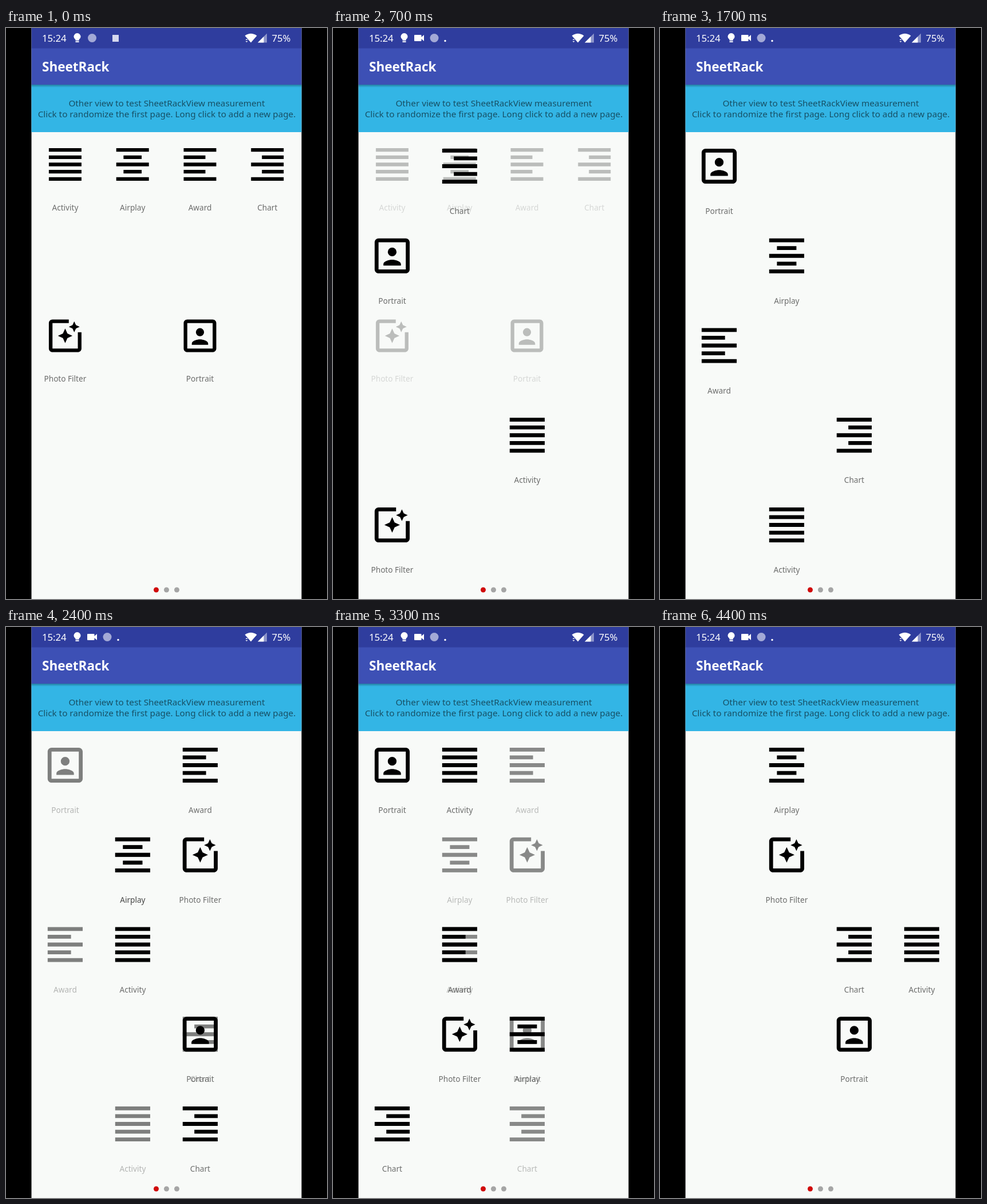
Animation, 561 px wide and 998 px high, one loop 4900 ms. Source, as an HTML page:

```html
<!DOCTYPE html>
<html lang="en">
<head>
<meta charset="utf-8">
<title>Shuffled grid</title>
<style>
  html, body { margin: 0; width: 100%; height: 100%; overflow: hidden; background: #000; }
  svg { display: block; font-family: "Noto Sans", sans-serif; }
  .status { font-size: 16.7px; fill: #fff; }
  .title { font-size: 22.5px; font-weight: 700; fill: #fff; }
  .banner { font-size: 15.25px; fill: #000; fill-opacity: .56; text-anchor: middle; }
  .label { font-size: 13.6px; fill: #000; fill-opacity: .57; text-anchor: middle; }
</style>
</head>
<body>
<svg width="561" height="998" viewBox="0 0 561 998">
  <defs>
    <linearGradient id="shade" x2="0" y2="1">
      <stop stop-opacity=".3"/>
      <stop offset="1" stop-opacity="0"/>
    </linearGradient>
  </defs>
  <rect width="561" height="998"/>
  <rect x="44.5" width="472" height="998" fill="#f8faf8"/>
  <rect x="44.5" y="99" width="472" height="83" fill="#33b5e5"/>
  <rect x="44.5" y="99" width="472" height="5" fill="url(#shade)"/>
  <rect x="44.5" y="35" width="472" height="64" fill="#3d50b5"/>
  <rect x="44.5" width="472" height="35.5" fill="#2f3d9e"/>

  <g class="status">
    <text x="63" y="24">15:24</text>
    <text x="464.5" y="24">75%</text>
    <path d="M121.500 22v-1.800a6 6 0 1 1 6 0v1.800zM121.500 23h6v2h-6z"/>
    <circle id="bubble" cy="17.500" r="7.500" fill="#a3a9d6"/>
    <rect id="badge" x="186" y="12" width="11" height="12" fill="#d5d8ee"/>
    <g id="recording">
      <path d="M143 12h10.500q1 0 1 1v3l4.500-4v11l-4.500-4v3q0 1-1 1h-10.500q-1 0-1-1v-9q0-1 1-1z"/>
      <circle cx="196" cy="22.500" r="1.700"/>
    </g>
    <path d="M417.500 13.500q10.500-7.500 21 0l-10.500 12z"/>
    <path d="M418.500 21l2-2 2 2zM418.500 23l2 2 2-2z"/>
    <path d="M440 25.500l16-16v16z" fill-opacity=".45"/>
    <path d="M440 25.500l10.500-10.500v10.500z"/>
  </g>

  <text class="title" x="63" y="76">SheetRack</text>
  <g class="banner">
    <text x="281" y="137">Other view to test SheetRackView measurement</text>
    <text x="281" y="156">Click to randomize the first page. Long click to add a new page.</text>
  </g>

  <g id="pages"></g>

  <g fill="#a5a5a5">
    <circle cx="262.500" cy="982" r="4.500" fill="#d00a0a"/>
    <circle cx="280.500" cy="982" r="4.500"/>
    <circle cx="298.500" cy="982" r="4.500"/>
  </g>
</svg>
<script>
const LOOP = 4900, STEP = 100, FADE = 250;
const $ = id => document.getElementById(id);
const clamp = v => Math.max(0, Math.min(1, v));

// Five text lines; the second and fourth are the short ones.
const lines = (x, w) => [3, 7, 11, 15, 19]
  .map((y, i) => i % 2 ? `M${x} ${y}h${w}v2h${-w}z` : `M3 ${y}h18v2H3z`).join("");

const items = {
  J: ["Activity", lines(3, 18)],
  C: ["Airplay", lines(7, 10)],
  L: ["Award", lines(3, 12)],
  R: ["Chart", lines(9, 12)],
  F: ["Photo Filter", "M19 10v9H5V5h9V3H5c-1.1 0-2 .9-2 2v14c0 1.100.9 2 2 2h14c1.100 0 2-.9 2-2v-9z" +
    "M17 10l.94-2.060L20 7l-2.060-.94L17 4l-.94 2.060L14 7l2.060.94z" +
    "M13.250 10.750L12 8l-1.250 2.750L8 12l2.750 1.250L12 16l1.250-2.750L16 12z"],
  P: ["Portrait", "M9.750 10a2.250 2.250 0 1 1 4.500 0a2.250 2.250 0 1 1-4.500 0z" +
    "M16.500 16.250c0-1.500-3-2.250-4.500-2.250s-4.500.75-4.500 2.250V17h9z" +
    "M19 3H5c-1.100 0-2 .9-2 2v14c0 1.100.9 2 2 2h14c1.100 0 2-.9 2-2V5c0-1.100-.9-2-2-2zM19 19H5V5h14z"]
};

const wide = { top: 238.5, rowGap: 299.5, colGap: 117.8, scale: 3.167, labelY: 80 };
const tight = { top: 241.5, rowGap: 156.75, colGap: 118, scale: 3.4, labelY: 83.5 };

// start: when the page begins to fade in over the previous one
const pages = [
  { start: -FADE, grid: wide, rows: "JCLR F.P." },
  { start: 483, grid: tight, rows: ".R.. P... .... ..J. F..." },
  { start: 1260, grid: tight, rows: "P... .C.. L... ..R. .J.." },
  { start: 2222, grid: tight, rows: "..L. .CF. .J.. ..P. ..R." },
  { start: 3115, grid: tight, rows: "PJ.. .... .L.. .FC. R..." },
  { start: 3930, grid: tight, rows: ".C.. .F.. ..RJ ..P." }
];

function drawCell(key, row, col, g) {
  if (key === ".") return "";
  const [name, path] = items[key];
  return `<g transform="translate(${103.4 + col * g.colGap} ${g.top + row * g.rowGap})">
    <path fill-rule="evenodd" transform="scale(${g.scale}) translate(-12 -12)" d="${path}"/>
    <text class="label" y="${g.labelY}">${name}</text></g>`;
}

$("pages").innerHTML = pages.map(({ rows, grid }) => "<g>" +
  rows.split(" ").map((line, row) =>
    [...line].map((key, col) => drawCell(key, row, col, grid)).join("")).join("") +
  "</g>").join("");
const layers = [...$("pages").children];

function render(now) {
  const t = Math.floor(now % LOOP / STEP) * STEP;
  const progress = page => page ? clamp((t - page.start) / FADE) : 0;

  layers.forEach((layer, i) => {
    const fadeIn = Math.min(1, 1.4 * progress(pages[i]));
    const fadeOut = 1 - progress(pages[i + 1]) ** 2;
    layer.setAttribute("opacity", fadeIn * fadeOut);
  });

  const shift = clamp(t / 300);
  $("bubble").setAttribute("cx", 150.5 + 26.5 * shift);
  $("badge").setAttribute("opacity", 1 - shift);
  $("recording").setAttribute("opacity", shift);
}

const begin = performance.now();
(function tick() {
  render(performance.now() - begin);
  requestAnimationFrame(tick);
})();
</script>
</body>
</html>
```
